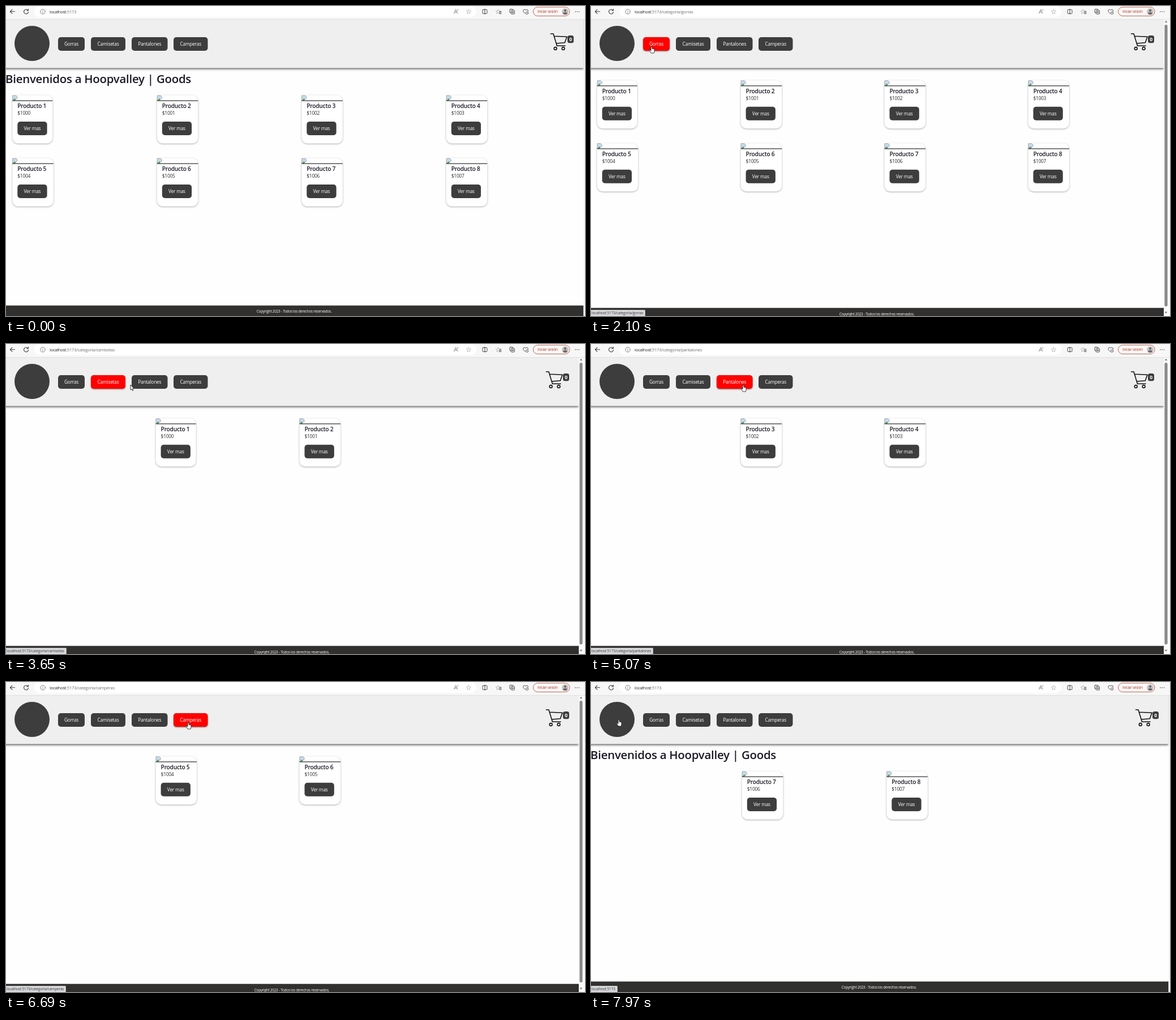
An HTML page for the animation above (8 s loop, 1023 px wide and 547 px high).

```html
<!DOCTYPE html>
<html lang="es">
<head>
<meta charset="utf-8">
<title>Tienda</title>
<style>
  html, body { margin: 0; width: 100%; height: 100%; overflow: hidden; background: #fefefe; }
  svg { position: absolute; left: 0; top: 0; display: block; }
  svg, #status { font-family: "Open Sans", "Noto Sans", sans-serif; letter-spacing: -.015em; }
  .icon { fill: none; stroke: #3c3c3c; stroke-width: .9; stroke-linecap: round; stroke-linejoin: round; }
  .star { font: 12px "DejaVu Sans", sans-serif; fill: #666; text-anchor: middle; }
  .header { fill: #efefef; filter: drop-shadow(0 1.5px 2.2px rgba(0, 0, 0, .85)); }
  .dark { fill: #3d3d3d; }
  .label { fill: #fff; font-size: 8.35px; text-anchor: middle; }
  .card { fill: #fff; filter: drop-shadow(0 1.5px 1.8px rgba(0, 0, 0, .32)); }
  .name { font-size: 10.2px; font-weight: 600; fill: #1a1a26; }
  .price { font-size: 8.4px; fill: #2b2b2e; }
  .title { font-size: 20.4px; font-weight: 600; fill: #1a1a28; }
  .legal { font-size: 6.4px; fill: #fff; text-anchor: middle; }
  .url { font-size: 7.5px; fill: #6e6e6e; }
  .pointer { fill: #fff; stroke: #111; stroke-width: .8; stroke-linejoin: round; }
  #status { position: absolute; left: 0; top: 536px; height: 11px; box-sizing: border-box;
    padding: 0 3px 0 1px; border: solid #b4b4b4; border-width: 1px 1px 0 0; border-radius: 0 2px 0 0;
    background: #d9dadd; color: #333; font-size: 6.4px; line-height: 10px; white-space: nowrap; }
</style>
</head>
<body>
<svg width="1023" height="547" viewBox="0 0 1023 547">
  <rect width="1023" height="547" fill="#fefefe"/>
  <g id="page"></g>
  <g id="nav"></g>

  <g id="toolbar">
    <rect width="1023" height="24" fill="#f7f7f7"/>
    <path d="M0 23.8H1023" stroke="#d8d8d8" stroke-width=".8"/>
    <rect x="50" width="781" height="19.5" rx="9.5" fill="#fff"/>
    <g class="icon">
      <path d="M15.5 9.8H7.5M11 6.2L7.3 9.8L11 13.4" stroke-width="1.1"/>
      <path d="M38.8 7.6A4 4 0 1 0 39.5 10.6M39.4 5.4V8H36.8" stroke-width="1.1"/>
      <circle cx="65" cy="10" r="4.2" stroke="#777"/>
      <path d="M65 9.6V12M65 7.8V7.9" stroke="#777"/>
      <path d="M791.7 13L794.7 6L797.7 13M792.8 10.7H796.6M797.8 8.2Q799.8 6.8 798 5.6" stroke="#777"/>
      <rect x="842" y="6.4" width="8" height="7" rx="1"/>
      <path d="M846 5.2V14.5M872 9.5H875M871.5 11.5H875M872 13.5H875"/>
      <rect x="890" y="5.6" width="6" height="6.5" rx="1.2"/>
      <rect x="892.5" y="7.6" width="6" height="6.6" rx="1.2" fill="#f7f7f7"/>
      <path d="M895.5 9.3V12.5M893.9 10.9H897.1"/>
      <path d="M917 13.3L914.4 10.5Q913 8.3 914.6 6.7Q916.5 5.3 918.2 7.2Q920 5.3 921.8 6.8Q923 8 922.3 9.6"/>
      <circle cx="920.5" cy="12.4" r="2.1"/>
    </g>
    <text class="star" x="817.2" y="14.2">☆</text>
    <text class="star" x="869.2" y="13.8">☆</text>
    <path d="M1006 10H1013" stroke="#3c3c3c" stroke-width="1.6" stroke-linecap="round" stroke-dasharray="0 3.2"/>
    <rect x="931.5" y="2" width="64.5" height="15.6" rx="7.8" fill="#fdf8f7" stroke="#b4523f" stroke-width=".9"/>
    <text x="939" y="12.2" font-size="6.45" fill="#a83a28">Iniciar sesión</text>
    <circle cx="988" cy="10" r="6" fill="#c4c4c4"/>
    <circle cx="988" cy="8.1" r="2.1" fill="#6a6a6a"/>
    <ellipse cx="988" cy="12.9" rx="3.6" ry="2" fill="#6a6a6a"/>
    <text class="url" x="77" y="12.7"><tspan fill="#222">localhost</tspan>:5173<tspan id="path"></tspan></text>
  </g>

  <g id="cursor" class="pointer">
    <path id="arrow" d="M0 0V9L2 7.2L3.5 10.4L4.9 9.8L3.5 6.7H6.2Z"/>
    <path id="hand" d="M-1 .8Q0 -.8 1 .8V4.2Q5 3.8 5 6V8.5Q5 10 4.1 12H-.8Q-1.6 10.2 -3.4 8Q-4.2 6.6 -3.1 6.2Q-2.2 6.2 -1 7.8Z"/>
  </g>
</svg>
<div id="status"></div>

<script>
const LOOP = 8000, LOAD_DELAY = 500, HOVER_FADE = 300, STEP = 70;
const $ = id => document.getElementById(id);

const buttons = [
  { text: 'Gorras', x: 92, w: 47 },
  { text: 'Camisetas', x: 150, w: 61 },
  { text: 'Pantalones', x: 222, w: 63.5 },
  { text: 'Camperas', x: 296, w: 60.5 }
];

// Navigation: time of the click and chosen button (-1 is the home page).
const visits = [[0, -1], [1970, 0], [3370, 1], [4860, 2], [6290, 3], [7910, -1]];
const hints = [[0, null], [2040, 0], [3440, 1], [4930, 2], [5560, 3], [7850, -1]];

// Pointer moves: first step, last step, end point.
const entry = [985, 548];
const moves = [
  [130, 260, 856, 503], [400, 600, 851, 487], [790, 930, 437, 216],
  [1130, 1130, 457, 219], [1200, 1610, 115, 72], [1750, 1750, 107, 71],
  [2420, 2630, 146, 72], [2770, 2770, 148, 72], [2830, 2970, 178, 71],
  [3510, 3650, 220, 72], [3850, 3990, 256, 71],
  [5000, 5070, 269, 72], [5140, 5490, 322, 71],
  [7090, 7160, 339, 76], [7360, 7850, 49, 66]
];

const latest = (list, t) => list.findLast(item => item[0] <= t);
const route = n => n < 0 ? '' : '/categoria/' + buttons[n].text.toLowerCase();

function pointer(t) {
  const i = moves.findLastIndex(move => move[0] <= t);
  if (i < 0) return null;
  const [from, to, x, y] = moves[i];
  const [x0, y0] = i ? moves[i - 1].slice(2) : entry;
  const steps = Math.round((to - from) / STEP) + 1;
  const p = t >= to ? 1 : (Math.floor((t - from) / STEP) + 1) / steps;
  const eased = steps > 5 ? 1 - (1 - p) ** 2 : p;
  return [x0 + (x - x0) * eased, y0 + (y - y0) * eased];
}

function hovered(t) {
  const at = pointer(t);
  if (!at) return -1;
  const [x, y] = at;
  return buttons.findIndex(b => x >= b.x && x <= b.x + b.w && y >= 55 && y <= 79);
}

function hoverLevel(n, t) {
  const samples = 10;
  let hits = 0;
  for (let i = 0; i < samples; i++) hits += hovered(t - i * HOVER_FADE / samples) === n;
  return hits / samples;
}

const button = (x, y, w, text) => `<rect class="dark" x="${x}" y="${y}" width="${w}" height="24" rx="5"/>
  <text class="label" x="${x + w / 2}" y="${y + 15.3}">${text}</text>`;

function card(n, x, y) {
  const w = n === 1 ? 71 : 72.5;
  return `<g transform="translate(${x} ${y})">
    <rect class="card" width="${w}" height="85" rx="10"/>
    <path d="M.4 9V.4H6.3L8.6 2.7V5L4 9Z" fill="#c9d9ee" stroke="#8d969c" stroke-width=".8"/>
    <path d="M1 9L4 5.5L6 7.5L3.5 9.5Z" fill="#4e9a4b"/>
    <path d="M0 9.6H${w}" stroke="#333" stroke-width="1.2"/>
    <text class="name" x="9" y="22.3">Producto ${n}</text>
    <text class="price" x="9" y="34.4">$${999 + n}</text>
    ${button(9, 46.5, 52.3, 'Ver mas')}
  </g>`;
}

function cards(loaded, home) {
  const x0 = home ? 11.3 : 10.7, gap = home ? 255.5 : 253.9, y0 = home ? 157.5 : 131.3;
  const all = loaded < 0;
  return Array.from({ length: all ? 8 : 2 }, (_, i) => {
    const col = all ? i % 4 : i + 1, row = all ? Math.floor(i / 4) : 0;
    return card(all ? i + 1 : loaded * 2 + i + 1, x0 + col * gap, y0 + row * 111);
  }).join('');
}

const cart = dx => `<g transform="translate(${dx} 0)">
  <g fill="none" stroke="#111" stroke-width="1.6" stroke-linejoin="round" stroke-linecap="round">
    <path d="M962.5 49H967L973.5 70.3H988M968.8 53.3L991 54.3L987.3 64.8L972 66"/>
    <circle cx="970.7" cy="75" r="2.4"/><circle cx="984.6" cy="75" r="2.4"/>
  </g>
  <rect class="dark" x="992" y="52" width="11" height="13.2" rx="3.5"/>
  <text x="997.5" y="61.8" font-size="8.6" font-weight="700" fill="#fff" text-anchor="middle">0</text>
</g>`;

const scrollbar = `<rect x="1012" y="24" width="11" height="523" fill="#fafafa"/>
  <rect x="1013.4" y="33" width="5.2" height="497" rx="2.6" fill="#8a8a8a"/>
  <path d="M1013.8 29L1016 25.8L1018.2 29ZM1013.8 539.5L1016 542.7L1018.2 539.5Z" fill="#777"/>`;

function page(active, loaded) {
  const home = active < 0, width = home ? 1020.5 : 1012, footer = home ? 528.5 : 532.7;
  return `<rect class="header" x="-8" y="20" width="${width + 8}" height="89.5"/>
    <circle class="dark" cx="46" cy="66" r="31"/>
    ${cart(home ? 0 : -8)}
    ${home ? '<text class="title" x="-1" y="135.6">Bienvenidos a Hoopvalley | Goods</text>' : ''}
    ${cards(loaded, home)}
    <rect y="${footer}" width="${width}" height="20" fill="#32302e"/>
    <text class="legal" x="${home ? 509 : 505}" y="${footer + 12.8}">Copyright 2023 - Todos los derechos reservados.</text>
    ${home ? '<rect x="1020.5" y="24" width="2.5" height="523" fill="#f5f5f5"/>' : scrollbar}`;
}

$('nav').innerHTML = buttons.map(b => button(b.x, 55, b.w, b.text)).join('');
const navRects = [...$('nav').querySelectorAll('rect')];
let shown = '';

function render(t) {
  const active = latest(visits, t)[1];
  const loaded = latest(visits, Math.max(0, t - LOAD_DELAY))[1];
  const key = active + ':' + loaded;
  if (key !== shown) {
    shown = key;
    $('page').innerHTML = page(active, loaded);
    $('path').textContent = route(active);
  }

  navRects.forEach((rect, n) => {
    const level = hoverLevel(n, t);
    rect.style.fill = n === active ? '#f00' : '#3d3d3d';
    rect.style.filter = level ? `drop-shadow(0 1.5px 1.2px rgba(0, 0, 0, ${level * .5}))` : 'none';
  });

  const hint = latest(hints, t)[1];
  $('status').style.display = hint === null ? 'none' : 'block';
  $('status').textContent = hint === null ? '' : 'localhost:5173' + route(hint);

  const at = pointer(t);
  $('cursor').style.display = at ? 'block' : 'none';
  if (at) {
    const [x, y] = at;
    const link = hovered(t) >= 0 || Math.hypot(x - 46, y - 66) < 38;
    $('cursor').setAttribute('transform', `translate(${x} ${y})`);
    $('hand').style.display = link ? 'block' : 'none';
    $('arrow').style.display = link ? 'none' : 'block';
  }
}

const start = performance.now();
function tick() {
  render((performance.now() - start) % LOOP);
  requestAnimationFrame(tick);
}
tick();
</script>
</body>
</html>
```
